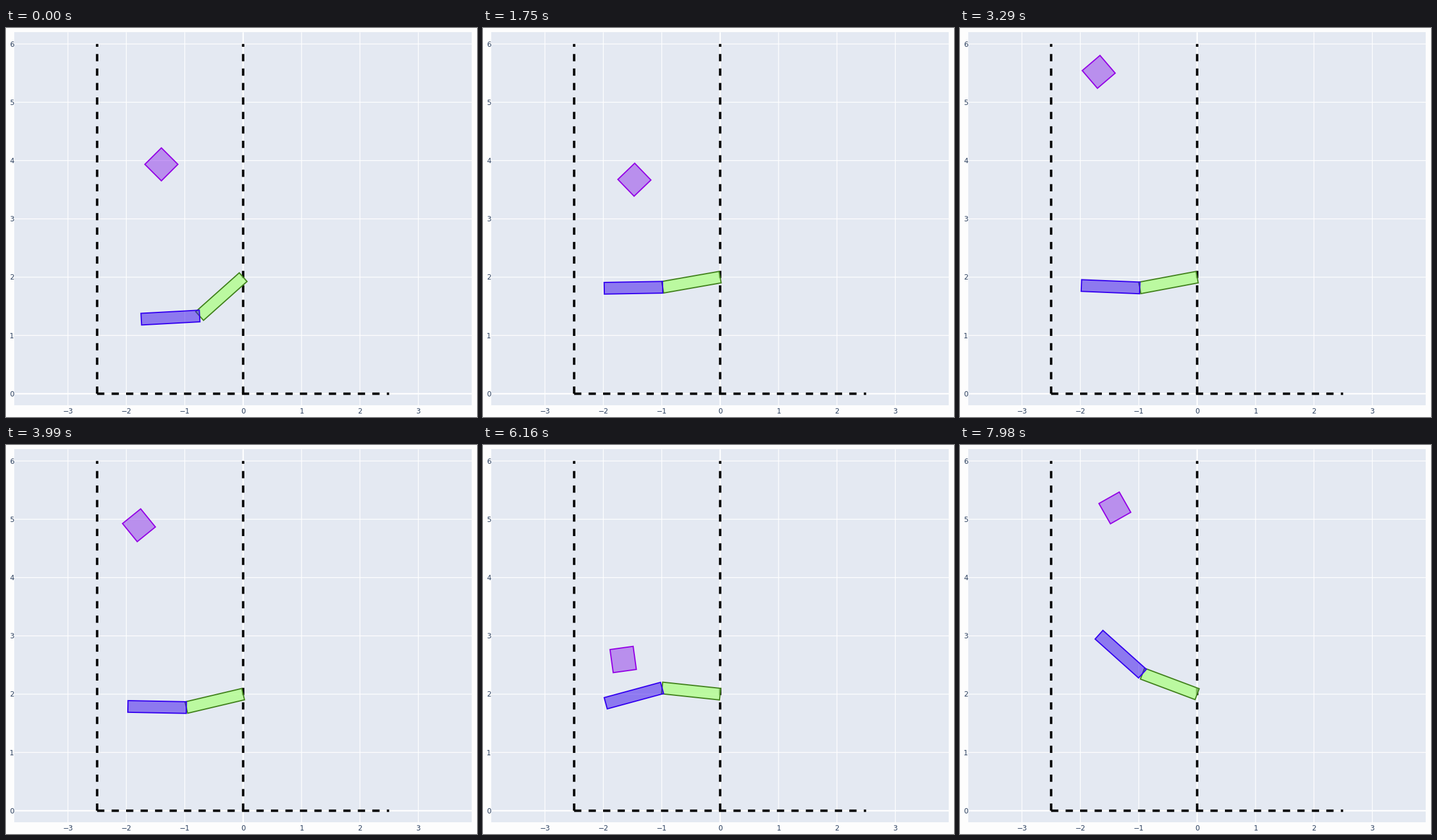
A matplotlib script for the animation above (8000 ms loop, 800x662 px).

```python
import numpy as np
import matplotlib.pyplot as plt
from matplotlib.animation import FuncAnimation
from matplotlib.patches import Polygon, Rectangle

W, H, DPI = 800, 662, 100
PX = 72 / DPI                      # points per pixel
X0, Y0, UNIT = 402.8, 622.4, 99.2  # pixel of the data origin, pixels per unit
LOOP, TICK, HOLD = 8000, 20, 70    # ms
G = 1.869
SHOULDER = np.array([0.0, 2.0])


def smooth(s):
    return s * s * (3 - 2 * s)


def strike(s):
    return s ** 2


def flick(s):
    return s ** 3


# Where the box is hit: time, x, y, angle; it flies freely in between
HITS = [
    (0.000, -1.400, 3.935, 45.0),
    (1.265, -1.400, 2.171, 45.0),
    (5.090, -1.939, 2.066, 36.6),
    (6.010, -1.681, 2.104, 6.1),
    (7.980, -1.409, 5.195, 29.5),
]

# Arm poses: time, upper and lower link angle, easing towards the next pose
POSES = [
    (0.00, -41.8, -3.1, strike),
    (1.26, -11.2, -3.4, smooth),
    (2.52, -7.6, 3.8, smooth),
    (3.99, -13.3, 1.1, smooth),
    (4.97, -15.5, -6.1, flick),
    (6.16, 6.1, -15.2, smooth),
    (7.98, 20.6, 41.9, smooth),
]


def span(keys, t):
    """The keys on both sides of t and the fraction of the way between them."""
    i = max(k for k in range(len(keys) - 1) if keys[k][0] <= t)
    a, b = keys[i], keys[i + 1]
    return a, b, (t - a[0]) / (b[0] - a[0])


def arm_angles(t):
    a, b, s = span(POSES, t)
    e = a[3](s)
    return [a[k] + (b[k] - a[k]) * e for k in (1, 2)]


def box_corners(t):
    a, b, s = span(HITS, t)
    x, y, angle = (a[k] + (b[k] - a[k]) * s for k in (1, 2, 3))
    y += G / 2 * (b[0] - a[0]) ** 2 * s * (1 - s)
    turn = np.radians(angle + 45 + 90 * np.arange(4))
    r = 0.2 * np.sqrt(2)
    return np.column_stack([x + r * np.cos(turn), y + r * np.sin(turn)])


def link(base, angle):
    """Corners and far end of a link of length 1 and width 0.2."""
    a = np.radians(angle)
    end = base + np.array([-np.cos(a), np.sin(a)])
    side = 0.1 * np.array([np.sin(a), np.cos(a)])
    return np.array([base + side, end + side, end - side, base - side]), end


def to_x(px):
    return (px - X0) / UNIT


def to_y(py):
    return (Y0 - py) / UNIT


fig = plt.figure(figsize=(W / DPI, H / DPI), dpi=DPI, facecolor="#fdfdfd")
ax = fig.add_axes([0, 0, 1, 1])
ax.set(xlim=(to_x(0), to_x(W)), ylim=(to_y(H), to_y(0)))
ax.axis("off")

LEFT, RIGHT, TOP, BOTTOM = to_x(14.3), to_x(791), to_y(7.3), to_y(642.3)
ax.add_patch(Rectangle((LEFT, BOTTOM), RIGHT - LEFT, TOP - BOTTOM,
                       fc="#e4e9f2", lw=0, zorder=0))


def line(xs, ys, width, color, **kw):
    ax.plot(xs, ys, color=color, lw=width * PX, snap=False,
            solid_capstyle="butt", **kw)


def label(x, y, value, ha):
    ax.text(x, y, str(value).replace("-", "\u2212"), ha=ha, va="baseline",
            family="DejaVu Sans", size=12 * PX, color="#2a3f5f")


for v in range(-3, 4):
    line([v, v], [BOTTOM, TOP], 1.3 if v else 2.4, "white", zorder=1)
    label(v, to_y(655.5), v, "center")
for v in range(7):
    line([LEFT, RIGHT], [v, v], 1.3 if v else 2.4, "white", zorder=1)
    label(to_x(13.6), v - 4.4 / UNIT, v, "right")

for xs, ys in [((-2.5, -2.5), (0, 6)), ((0, 0), (0, 6)), ((-2.5, 2.5), (0, 0))]:
    line(xs, ys, 4.1, "black", ls=(0, (3, 3)), dash_capstyle="butt", zorder=2)


def shape(fill, alpha, edge, zorder):
    rgb = [c / 255 for c in fill]
    return ax.add_patch(Polygon(np.zeros((4, 2)), closed=True, fc=(*rgb, alpha),
                                ec=edge, lw=2 * PX, joinstyle="miter",
                                zorder=zorder))


box = shape((143, 55, 234), 0.5, "#9400e6", 3)
upper = shape((172, 255, 130), 0.73, "#42821e", 4)
lower = shape((55, 11, 238), 0.5, "#3300f0", 5)


def update(i):
    # the picture is held for HOLD ms; the middle of the tick decides which one
    t = (i * TICK + TICK // 2) // HOLD * HOLD / 1000
    box.set_xy(box_corners(t))
    upper_angle, lower_angle = arm_angles(t)
    corners, elbow = link(SHOULDER, upper_angle)
    upper.set_xy(corners)
    lower.set_xy(link(elbow, lower_angle)[0])
    return box, upper, lower


anim = FuncAnimation(fig, update, frames=LOOP // TICK, interval=TICK,
                     init_func=lambda: update(0), repeat=True, repeat_delay=0)
plt.show()
```
